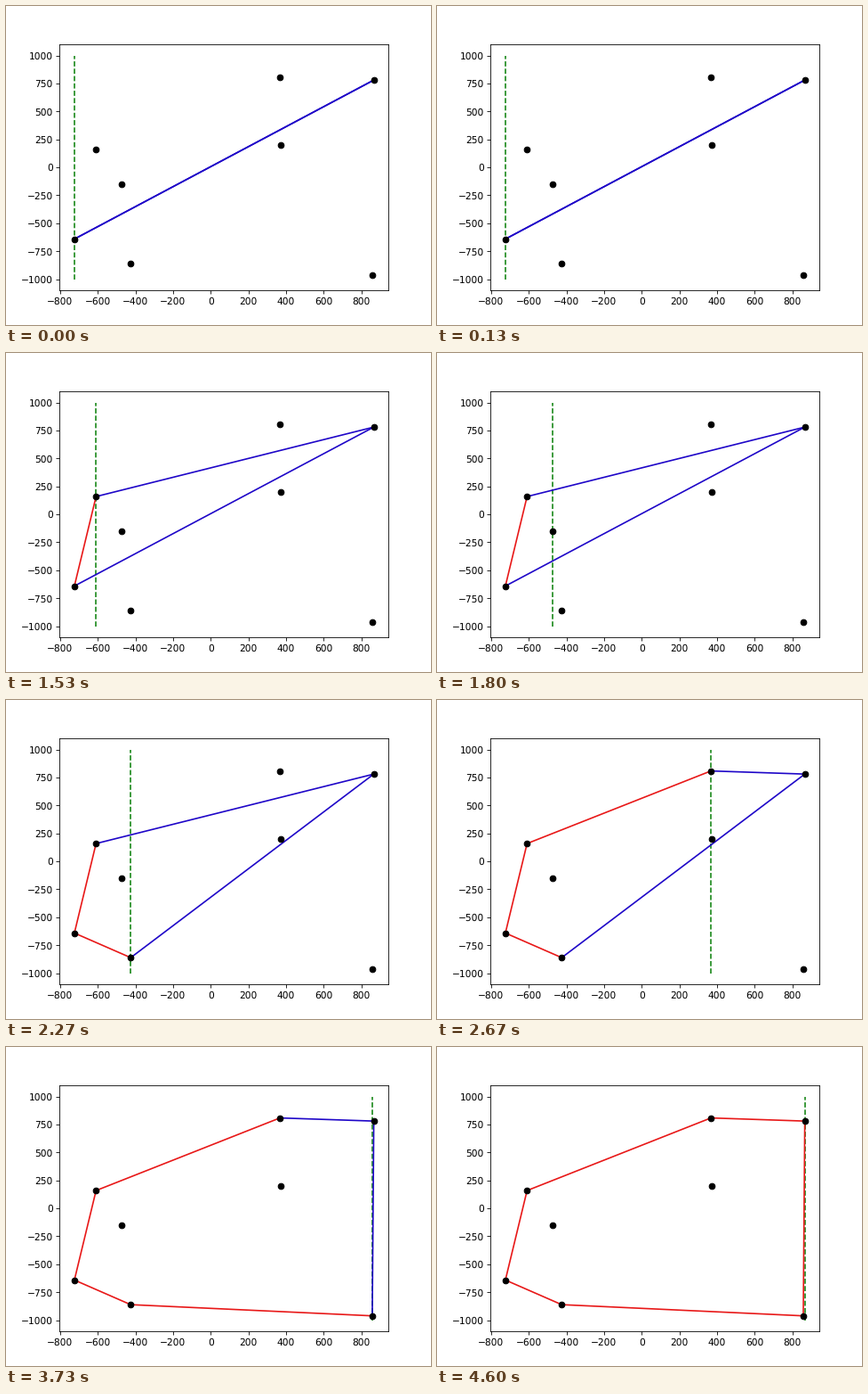
These frames come from a looping animation (478 by 358 pixels, 5340 ms). A matplotlib script:

```python
import matplotlib.pyplot as plt
from matplotlib.animation import FuncAnimation

DPI = 478 / 6.4
INTERVAL = 20
FRAMES = 267
STEP = 1600 / 3  # ms between sweep events
RED, BLUE, GREEN = "#e81818", "#1e06c8", "#0a800a"

# Sorted from left to right, the order in which the sweep meets them.
POINTS = [(-724, -641), (-609, 159), (-475, -147), (-425, -861),
          (367, 808), (370, 200), (857, -961), (865, 780)]
FIRST, LAST = POINTS[0], POINTS[-1]

plt.rcParams.update({"font.size": 10.3, "text.hinting": "none",
                     "lines.linewidth": 1.6, "lines.markersize": 6.4})


def cross(a, b, c):
    return (b[0] - a[0]) * (c[1] - a[1]) - (b[1] - a[1]) * (c[0] - a[0])


def chain(points, side):
    """Hull chain from the first point to the last; side is 1 above, -1 below."""
    out = [FIRST]
    for p in points[1:]:
        if p == LAST or side * cross(out[-1], LAST, p) > 0:
            while len(out) > 1 and side * cross(out[-2], out[-1], p) >= 0:
                out.pop()
            out.append(p)
    return out


fig, ax = plt.subplots(figsize=(6.4, 358.001 / DPI), dpi=DPI)
fig.subplots_adjust(left=0.1257, right=0.9006, bottom=0.1085, top=0.88)
margin = 0.05 * (LAST[0] - FIRST[0])
ax.set_xlim(FIRST[0] - margin, LAST[0] + margin)
ax.set_ylim(-1100, 1100)

sweep, = ax.plot([], [], "--", color=GREEN, lw=1.5, zorder=2)
hulls = [ax.plot([], [], color=RED, zorder=3)[0] for _ in range(2)]
bridges = [ax.plot([], [], color=BLUE, zorder=4)[0] for _ in range(2)]
ax.plot(*zip(*POINTS), "ko", zorder=5)


def update(frame):
    slot = int((frame * INTERVAL + 14) / STEP)
    k = min(max(slot - 1, 0), len(POINTS) - 1)
    x = POINTS[k][0]
    sweep.set_data([x, x], [-1000, 1000])
    for side, hull, bridge in zip((1, -1), hulls, bridges):
        path = chain(POINTS[:k + 1], side)
        hull.set_data(*zip(*path))
        bridge.set_data(*zip(path[-1], LAST))
        bridge.set_visible(path[-1] != LAST)
    return [sweep, *hulls, *bridges]


anim = FuncAnimation(fig, update, frames=FRAMES, interval=INTERVAL,
                     repeat=True, repeat_delay=0)
plt.show()
```
